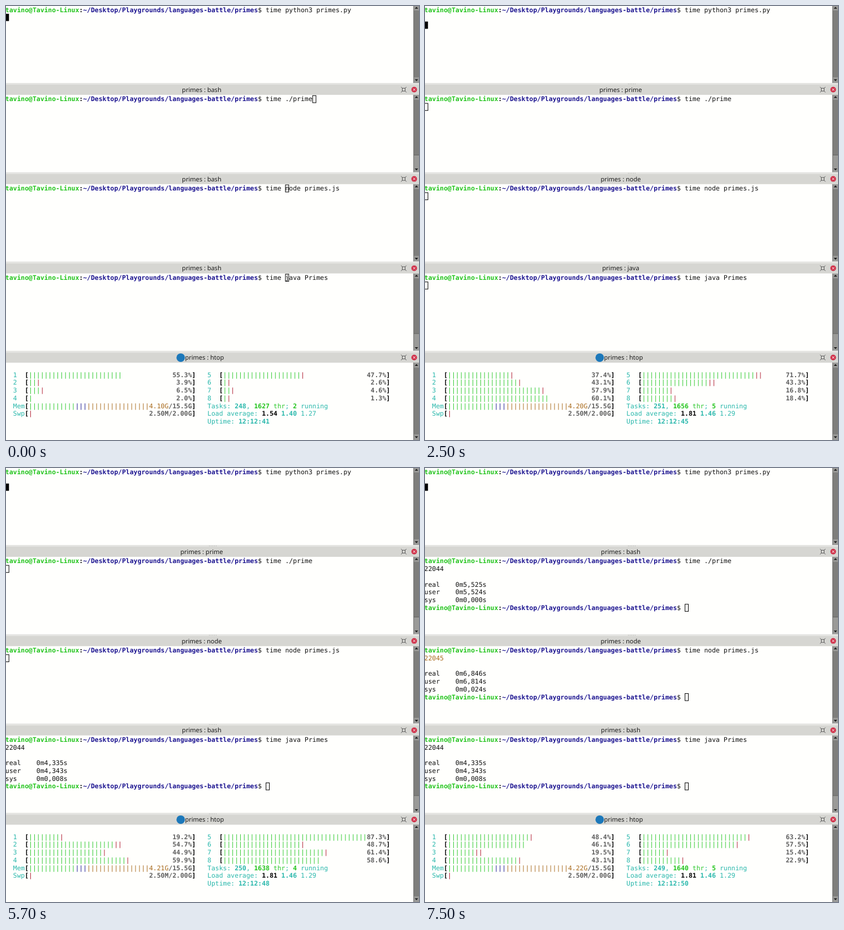
An HTML page with a canvas for the animation above (8000 ms loop, 730x767 px).

```html
<!DOCTYPE html>
<html lang="en">
<head>
<meta charset="utf-8">
<title>Primes battle</title>
<style>
  html, body { margin: 0; width: 100%; height: 100%; overflow: hidden; background: #fffffd; }
  canvas { display: block; }
</style>
</head>
<body>
<canvas id="stage" width="730" height="767"></canvas>
<script>
const ctx = document.getElementById('stage').getContext('2d');
const LOOP = 8000;
const CELL = 6.87, ROW = 13.74, LEFT = -1.2, ASCENT = 10.6, PANE = 157.8;
const MONO = '11.41px "DejaVu Sans Mono", monospace';
const TITLE = '11px "Noto Sans", sans-serif';
const C = {
  paper: '#fffffd', ink: '#101010', black: '#000', grey: '#5e5e5e',
  user: '#22c41c', path: '#1c1490', green: '#2cc82c', red: '#b01c30',
  blue: '#1a1890', brown: '#a86a1c', cyan: '#2ab8ac'
};
const USER = 'tavino@Tavino-Linux';
const DIR = '~/Desktop/Playgrounds/languages-battle/primes';
const PROMPT = USER.length + DIR.length + 3;
const START = 700;

const shells = [
  { cmd: 'time python3 primes.py', focus: true },
  { cmd: 'time ./prime', cursor: 12, titles: [[0, 'bash'], [2200, 'prime'], [6200, 'bash']],
    done: 6200, result: '22044', times: ['5,525', '5,524', '0,000'], short: true },
  { cmd: 'time node primes.js', cursor: 5, titles: [[0, 'bash'], [1200, 'node']],
    done: 7500, result: '22045', color: C.brown, times: ['6,846', '6,814', '0,024'] },
  { cmd: 'time java Primes', cursor: 5, titles: [[0, 'bash'], [1700, 'java'], [5700, 'bash']],
    done: 5200, result: '22044', times: ['4,335', '4,343', '0,008'], short: true }
];

// CPU entries: percentage, one "r" per kernel tick, "+" or "-" for a rounding tick
const samples = [
  [0, '55.3 3.9r 6.5r 2.0 47.7r 2.6r 4.6r 1.3r', '4.10', '248 1627 2', '41'],
  [100, '16.3 4.6r 5.8rr+ 3.3r 85.1r 6.0r- 3.3rr+ 1.3r', '4.16', '248 1630 2', '43'],
  [2500, '37.4r 43.1r 57.9r 60.1 71.7rr 43.3rr 16.8r 18.4r', '4.20', '251 1656 5', '45'],
  [3800, '55.8r 34.6r 49.4r 27.3r 49.0r 72.1 67.5rr+ 81.3r', '4.21', '251 1656 5', '47'],
  [5400, '19.2r 54.7rr 44.9r 59.9r 87.3 48.7r 61.4r 58.6', '4.21', '250 1638 4', '48'],
  [6900, '48.4r+ 46.1 19.5rr 43.1r 63.2r 57.5r 15.4r 22.9r', '4.22', '249 1640 5', '50']
];

const at = (list, t) => list.filter(e => e[0] <= t).pop();

function rect(x, y, w, h, color) {
  ctx.fillStyle = color;
  ctx.fillRect(x, y, w, h);
}

function disc(x, y, r, color) {
  ctx.fillStyle = color;
  ctx.beginPath();
  ctx.arc(x, y, r, 0, Math.PI * 2);
  ctx.fill();
}

function lines(color, width, segments) {
  ctx.strokeStyle = color;
  ctx.lineWidth = width;
  ctx.beginPath();
  for (const [x1, y1, x2, y2] of segments) {
    ctx.moveTo(x1, y1);
    ctx.lineTo(x2, y2);
  }
  ctx.stroke();
}

// Writes on the terminal grid and returns the next free column
function put(top, row, col, text, color = C.ink, bold = false) {
  ctx.font = (bold ? 'bold ' : '') + MONO;
  ctx.fillStyle = color;
  const y = top + row * ROW + ASCENT;
  for (const ch of text) {
    if (ch !== ' ') ctx.fillText(ch, LEFT + col * CELL, y);
    col++;
  }
  return col;
}

function runs(top, row, col, parts) {
  for (const [text, color, bold] of parts) col = put(top, row, col, text, color, bold);
}

function prompt(top, row, cmd = '') {
  runs(top, row, 0, [
    [USER, C.user, true], [':', C.ink, true], [DIR, C.path, true], ['$ ' + cmd, C.ink]
  ]);
}

function cursor(top, row, col, filled) {
  const x = LEFT + col * CELL, y = top + row * ROW;
  if (filled) return rect(x, y, CELL - 0.4, ROW - 0.9, C.black);
  ctx.strokeStyle = C.black;
  ctx.lineWidth = 1;
  ctx.strokeRect(x + 0.5, y + 0.5, CELL - 1, ROW - 1.1);
}

function header(top, title, icon) {
  rect(0, top - 21.8, 730, 3, '#e4e4e1');
  for (let x = 359; x < 372; x += 3) rect(x, top - 20.5, 1, 1, '#a8a8a6');
  rect(0, top - 18.8, 730, 18, '#d6d6d2');

  ctx.font = TITLE;
  ctx.fillStyle = '#1c1c1c';
  ctx.textAlign = 'center';
  ctx.fillText('primes : ' + title, icon ? 350.8 : 345.9, top - 6);
  ctx.textAlign = 'left';
  if (icon) disc(308.8, top - 9.8, 7.5, '#1c78ba');

  const y = top - 10;
  ctx.strokeStyle = '#4a4a4a';
  ctx.lineWidth = 0.9;
  ctx.strokeRect(700.5, y - 2.5, 5, 5);
  const ticks = [];
  for (const sx of [-1, 1]) for (const sy of [-1, 1]) {
    ticks.push([703 + sx * 2.5, y + sy * 2.5, 703 + sx * 4.8, y + sy * 4.8]);
  }
  lines('#4a4a4a', 0.9, ticks);

  disc(721.5, y, 5, '#d0314a');
  lines('#fff', 1, [[719.5, y - 2, 723.5, y + 2], [723.5, y - 2, 719.5, y + 2]]);
}

function arrow(y, dir) {
  ctx.fillStyle = '#1a1a1a';
  ctx.beginPath();
  ctx.moveTo(722.5, y - dir * 1.5);
  ctx.lineTo(728.5, y - dir * 1.5);
  ctx.lineTo(725.5, y + dir * 1.8);
  ctx.fill();
}

function scrollbar(top, bottom, short) {
  rect(720, top - 1, 10, bottom - top + 1, '#9a9a98');
  rect(721, top + 8, 9, bottom - top - (short ? 39 : 18), '#7e7e7c');
  rect(720, top - 1, 1, bottom - top + 1, '#70706e');
  if (short) rect(721, bottom - 31, 9, 1, '#5c5c5a');
  arrow(top + 3.3, -1);
  arrow(bottom - 5, 1);
}

function shell(s, i, t) {
  const top = i * PANE;
  scrollbar(top, top + 136, s.short);
  if (s.titles) header(top, at(s.titles, t)[1]);
  prompt(top, 0, s.cmd);
  if (s.focus) return cursor(top, t < START ? 1 : 2, 0, true);
  if (t < START) return cursor(top, 0, PROMPT + s.cursor);
  if (t < s.done) return cursor(top, 1, 0);
  put(top, 1, 0, s.result, s.color);
  ['real', 'user', 'sys'].forEach((name, k) => {
    put(top, 3 + k, 0, name.padEnd(8) + '0m' + s.times[k] + 's');
  });
  prompt(top, 6);
  cursor(top, 6, PROMPT);
}

function meter(top, row, col, label, bars, value) {
  put(top, row, col, label, C.cyan);
  put(top, row, col + 3, '[', C.black, true);
  runs(top, row, col + 4, bars.map(([n, color]) => ['|'.repeat(n), color]));
  const width = value.reduce((n, part) => n + part[0].length, 0);
  runs(top, row, col + 46 - width, value);
  put(top, row, col + 46, ']', C.black, true);
}

function cpu(top, i, entry) {
  const pct = parseFloat(entry), ticks = pct * 0.42;
  const red = entry.split('r').length - 1;
  let total = red ? Math.round(ticks) + 1 : Math.ceil(ticks);
  if (entry.endsWith('+')) total++;
  if (entry.endsWith('-')) total--;
  meter(top, 1 + i % 4, i < 4 ? 2 : 52, String(i + 1),
    [[total - red, C.green], [red, C.red]], [[pct.toFixed(1) + '%', C.grey, true]]);
}

function htop(t) {
  const top = 4 * PANE;
  const [, cpus, mem, tasks, sec] = at(samples, t);
  const [procs, threads, running] = tasks.split(' ');
  const load = t < 2500 ? ['1.54', '1.40', '1.27'] : ['1.81', '1.46', '1.29'];
  header(top, 'htop', true);
  scrollbar(top, 767, false);
  cpus.split(' ').forEach((entry, i) => cpu(top, i, entry));
  meter(top, 5, 2, 'Mem', [[12, C.green], [3, C.blue], [16, C.brown]],
    [[mem + 'G', C.brown], ['/15.5G', C.grey, true]]);
  meter(top, 6, 2, 'Swp', [[1, C.red]], [['2.50M/2.00G', C.grey, true]]);
  runs(top, 5, 52, [
    ['Tasks: ', C.cyan], [procs, C.cyan, true], [', ', C.cyan], [threads, C.user, true],
    [' thr', C.green], ['; ', C.cyan], [running, C.user, true], [' running', C.cyan]
  ]);
  runs(top, 6, 52, [
    ['Load average: ', C.cyan], [load[0] + ' ', C.black, true],
    [load[1] + ' ', C.cyan, true], [load[2], C.cyan]
  ]);
  runs(top, 7, 52, [['Uptime: ', C.cyan], ['12:12:' + sec, C.cyan, true]]);
}

function draw(t) {
  rect(0, 0, 730, 767, C.paper);
  shells.forEach((s, i) => shell(s, i, t));
  htop(t);
}

ctx.textRendering = 'geometricPrecision';
const began = performance.now();
function tick() {
  draw((performance.now() - began) % LOOP);
  requestAnimationFrame(tick);
}
tick();
</script>
</body>
</html>
```
